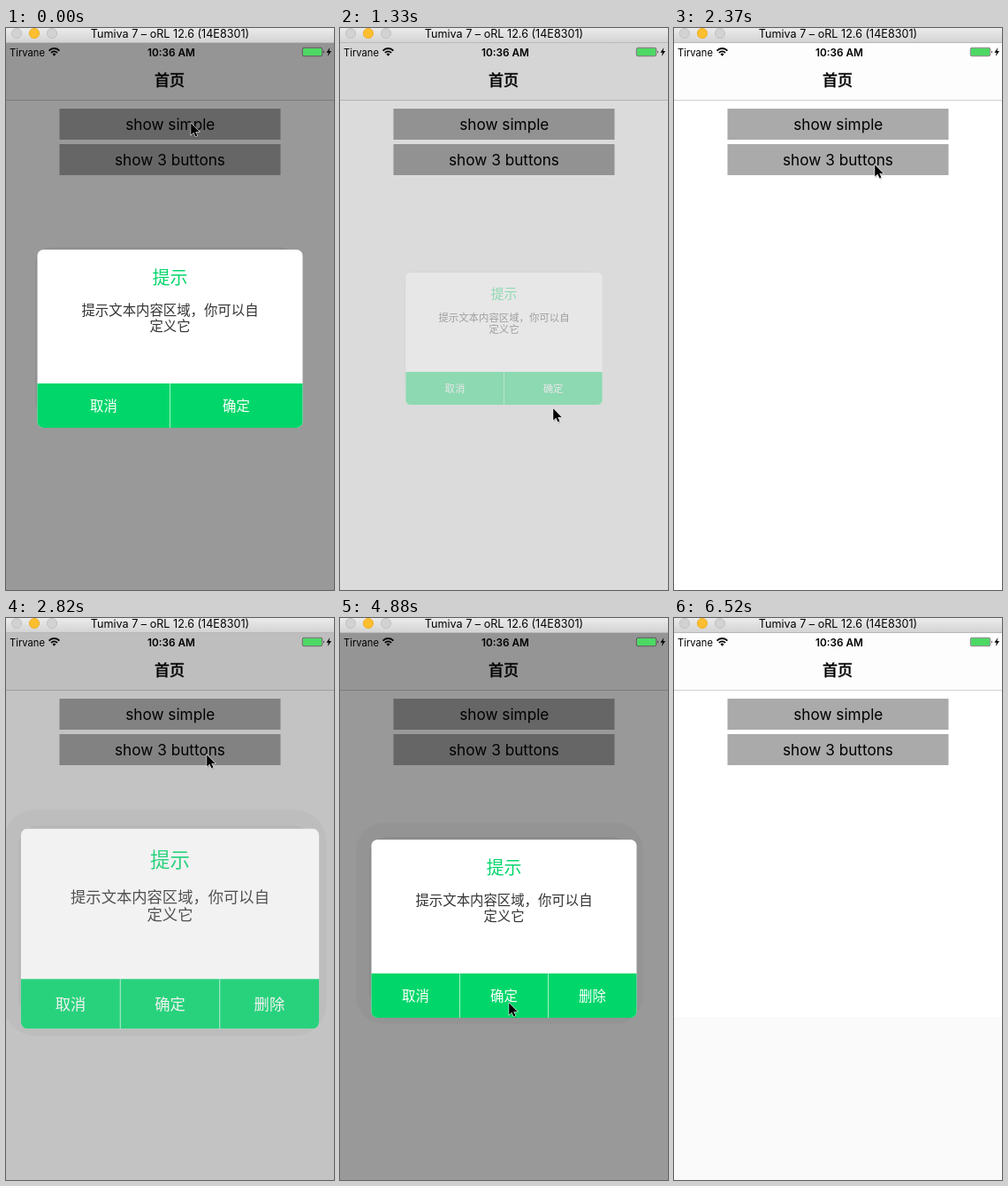
Recreate the animation shown at these times as an HTML page. Size 371 px wide and 634 px high, loop 7420 ms.

```html
<!DOCTYPE html>
<html lang="zh-CN">
<head>
<meta charset="utf-8">
<title>Alert dialog</title>
<style>
  html, body { margin: 0; width: 100%; height: 100%; overflow: hidden; background: #fff; }
  svg { display: block; font-family: Inter, "Noto Sans CJK SC", "Noto Sans CJK", sans-serif; }
  .mid { text-anchor: middle; }
  .cjk { font-family: "Noto Sans CJK SC", "Noto Sans CJK", sans-serif; font-size: 15.4px; }
</style>
</head>
<body>
<svg width="371" height="634" viewBox="0 0 371 634">
  <defs>
    <linearGradient id="chrome" x2="0" y2="1">
      <stop stop-color="#ebebeb"/><stop offset="1" stop-color="#d2d2d2"/>
    </linearGradient>
    <clipPath id="card"><rect x="35.5" y="250" width="300" height="201" rx="7"/></clipPath>
  </defs>

  <rect width="371" height="634" fill="#fff"/>
  <rect id="footer" y="450" width="371" height="184" fill="#fafafa"/>
  <rect id="nav" y="17" width="371" height="64"/>
  <rect y="81" width="371" height="1" fill="#d0d0d0"/>
  <text class="mid cjk" x="185" y="64.8" style="font-size:17px" stroke="#000" stroke-width=".5">首页</text>
  <g fill="#aaa">
    <rect x="60.5" y="91" width="250" height="35"/>
    <rect x="60.5" y="131" width="250" height="35"/>
  </g>
  <g class="mid" font-size="17.2">
    <text x="185.8" y="115">show simple</text>
    <text x="185.5" y="155">show 3 buttons</text>
  </g>

  <rect id="dim" y="17" width="371" height="617"/>

  <g id="dialog">
    <rect id="halo" x="18" y="231" width="325" height="227" rx="32" opacity=".035"/>
    <rect x="33" y="247" width="296" height="194" rx="20" opacity=".05"/>
    <g clip-path="url(#card)">
      <rect x="35" y="250" width="301" height="201" fill="#fff"/>
      <rect x="35" y="401" width="301" height="50" fill="#00d66a"/>
    </g>
    <text class="mid cjk" x="185.5" y="288.5" style="font-size:20px" fill="#00d66a">提示</text>
    <g class="mid cjk" fill="#333">
      <text x="185.5" y="324">提示文本内容区域，你可以自</text>
      <text x="185.5" y="342">定义它</text>
    </g>
    <g id="actions" class="mid cjk" fill="#fff"></g>
  </g>

  <rect width="371" height="17" fill="url(#chrome)"/>
  <rect y="16" width="371" height="1" fill="#b9b9b9"/>
  <g fill="#d2d2d2" stroke="#c2c2c2">
    <circle cx="12" cy="6" r="5.6"/>
    <circle cx="32" cy="6" r="5.6" fill="#fdbe2f" stroke="#eeb02c"/>
    <circle cx="52" cy="6" r="5.6"/>
  </g>
  <text class="mid" x="185.5" y="11" font-size="12.6">Tumiva 7 – oRL 12.6 (14E8301)</text>

  <text x="4" y="31.5" font-size="11.2">Tirvane</text>
  <g fill="none" stroke="#000" stroke-width="1.8">
    <path d="M48.6 25.6a8 8 0 0 1 11.8 0M50.9 28a5 5 0 0 1 7.2 0"/>
    <path d="M54.5 31.8l-2-2.2a2.8 2.8 0 0 1 4 0z" fill="#000" stroke="none"/>
  </g>
  <text class="mid" x="187" y="31.5" font-size="11.8" font-weight="600">10:36 AM</text>
  <rect x="335.3" y="22.3" width="22.4" height="9.4" rx="1.8" fill="#fff" fill-opacity=".3" stroke="#222" stroke-width=".6"/>
  <rect x="336" y="23" width="21" height="8" rx=".8" fill="#4cd964"/>
  <path d="M359 25.2q1.6 1.8 0 3.6z"/>
  <path d="M366.4 22l-4 5.8h2.4l-1 4.2 4.2-6h-2.6z"/>

  <g id="cursor">
    <g transform="translate(.6 .4) scale(.9)">
      <path d="M1 1v15.5l3.6-3.4 2.4 5.4 2.4-1-2.4-5.3h5z" transform="translate(.4 1)" opacity=".25"/>
      <path d="M.7 1v14.8l3.5-3.3 2.3 5.3 2.2-.9-2.3-5.2h4.8z" stroke="#fff" stroke-width="1.2" paint-order="stroke"/>
    </g>
  </g>
</svg>
<script>
const LOOP = 7420, TICK = 148, FADE = 165;
const $ = id => document.getElementById(id);
const set = (id, attributes) => {
  for (const name in attributes) $(id).setAttribute(name, attributes[name]);
};
const mix = (a, b, p) => a + (b - a) * p;
const progress = (now, start, length) => {
  const p = Math.min(1, Math.max(0, (now - start) / length));
  return p * p * (3 - 2 * p);
};

// Pointer strokes, timed in ticks
const home = { x: 208, y: 106 };
const strokes = [
  { start: 0, ticks: 2, x: 178, y: 384 },
  { start: 3, ticks: 4, x: 240, y: 428 },
  { start: 11, ticks: 5, x: 226, y: 153 },
  { start: 22, ticks: 2, x: 202, y: 401 },
  { start: 26, ticks: 2, x: 217, y: 420 },
  { start: 28, ticks: 3, x: 174, y: 438 },
  { start: 31, ticks: 2, x: 190, y: 433 },
  { start: 35, ticks: 4, x: 200, y: 145 },
  { start: 40, ticks: 3, x: 208, y: 119 }
];
const POINTER_GONE = 44;

const alerts = [
  { open: -FADE, close: 1233, labels: ['取消', '确定'] },
  { open: 2720, close: 5181, labels: ['取消', '确定', '删除'] }
];

function pointerAt(tick) {
  return strokes.reduce((from, to) => {
    const p = progress(tick, to.start, to.ticks);
    return { x: mix(from.x, to.x, p), y: mix(from.y, to.y, p) };
  }, home);
}

function actionRow(labels) {
  const width = 300 / labels.length;
  return labels.map((label, i) => {
    const x = 35.5 + i * width;
    const line = i ? `<rect x="${x - .5}" y="401" width="1" height="50" opacity=".65"/>` : '';
    return `${line}<text x="${x + width / 2}" y="432">${label}</text>`;
  }).join('');
}

let shown;

function draw() {
  const tick = Math.floor((performance.now() % LOOP + 5) / TICK);
  const now = tick * TICK;

  const { x, y } = pointerAt(tick);
  set('cursor', {
    transform: `translate(${x} ${y})`,
    visibility: tick < POINTER_GONE ? 'visible' : 'hidden'
  });

  // Shrinks into place from 1.3, then on to 0.6 while fading out
  const alert = alerts.findLast(({ open }) => open <= now);
  const opened = progress(now, alert.open, FADE);
  const closed = progress(now, alert.close, FADE);
  const scale = mix(1.3, 1, opened) - .4 * closed;
  const dim = .4 * opened * (1 - closed);
  set('dialog', {
    transform: `translate(185.5 350.5) scale(${scale}) translate(-185.5 -350.5)`,
    opacity: mix(.5, 1, opened) * (1 - closed)
  });
  set('dim', { opacity: dim });
  set('nav', { fill: dim ? '#f8f8f8' : '#fdfdfd' });

  const last = alert === alerts[1];
  set('halo', { visibility: last ? 'visible' : 'hidden' });
  set('footer', { visibility: last && closed === 1 ? 'visible' : 'hidden' });
  if (shown !== alert) {
    shown = alert;
    $('actions').innerHTML = actionRow(alert.labels);
  }
  requestAnimationFrame(draw);
}
draw();
</script>
</body>
</html>
```
